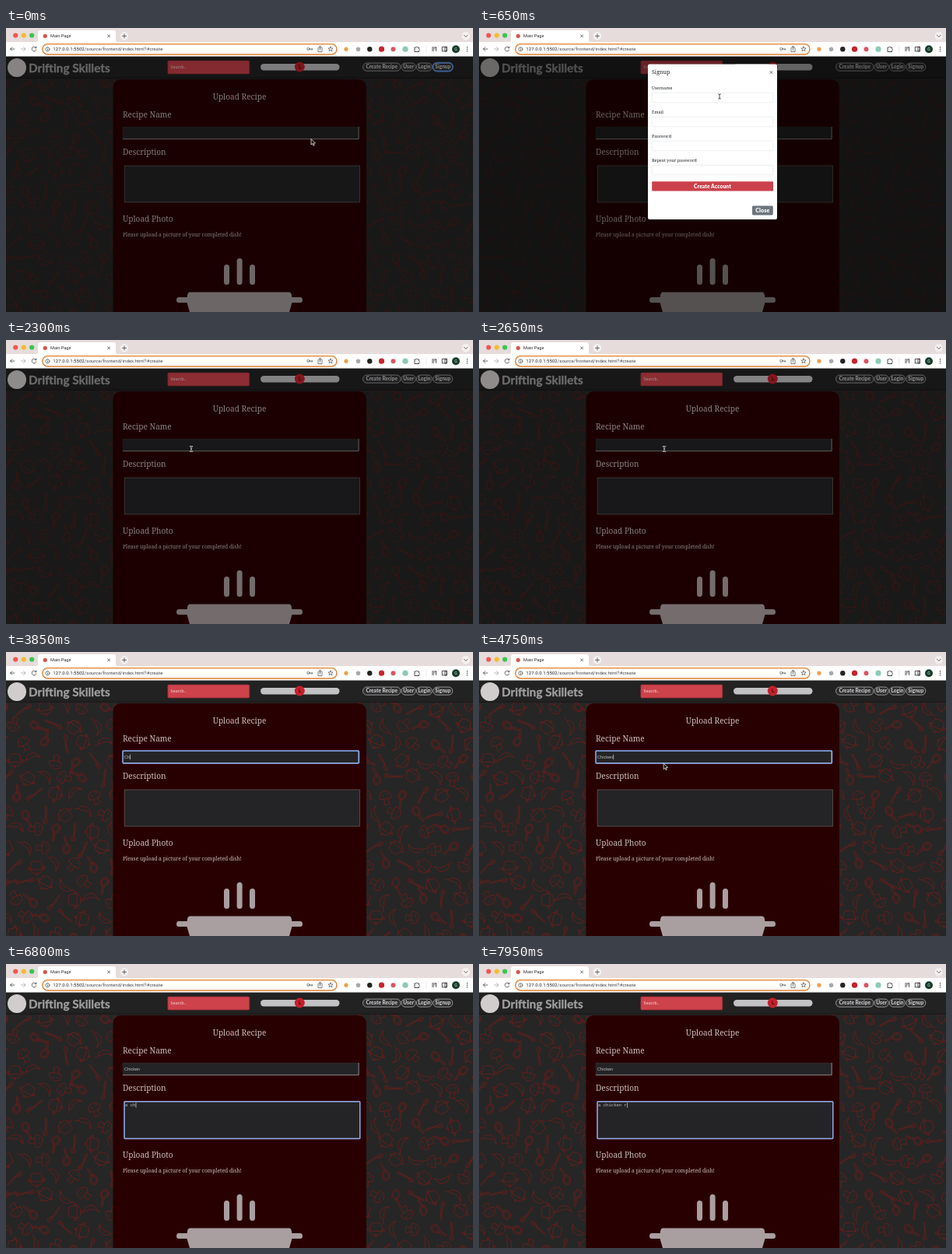
Recreate the animation shown at these times as an HTML page. Size 600 by 365 pixels, loop 8 s.

```html
<!DOCTYPE html>
<html lang="en">
<head>
<meta charset="utf-8">
<title>Upload Recipe</title>
<style>
  html, body { margin: 0; width: 100%; height: 100%; overflow: hidden; background: #262626; }
  svg { display: block; width: 100vw; height: 100vh; }
  text { white-space: pre; }
  .serif { font-family: "Noto Serif", serif; font-weight: 300; }
  .round { font-family: Lato, sans-serif; font-weight: 900; }
  .ui { font-family: Roboto, sans-serif; }
  .mid { text-anchor: middle; }
  .line { fill: none; stroke-linecap: round; stroke-linejoin: round; }
</style>
</head>
<body>
<svg viewBox="0 0 600 365" preserveAspectRatio="none">
  <defs>
    <g id="pan"><ellipse rx="6.5" ry="5"/><ellipse rx="4.5" ry="3.2"/><path d="M6 -2L15 -5.5Q17 -5 15.5 -3.5L6.5 0"/></g>
    <g id="chili"><path d="M-9 3Q-2 6 4 0Q7 -4 9 -3Q11 0 6 5Q-1 11 -9 3M9 -3Q9 -6 12 -7"/></g>
    <g id="spoon"><path d="M-3 0Q-8 -5 -12 -1Q-12 5 -3 0L11 -2Q13 -1 11 0L-3 1M-10 0Q-8 -2 -6 0"/></g>
    <g id="shroom"><path d="M-8 1Q-8 -8 0 -8Q8 -7 8 1Q0 4 -8 1M-3 2Q-2 6 -4 9Q0 11 4 9Q2 5 3 2M-4 -3h2M2 -4h2"/></g>
    <g id="pot"><path d="M-8 -3H8L6 7Q0 9 -6 7ZM-8 -3Q-7 -8 0 -8Q7 -8 8 -3M-1 -8v-2h2v2M-8 0h-3v-2h3M8 0h3v-2h-3"/></g>
  </defs>

  <rect y="36" width="600" height="329" fill="#262626"/>
  <g id="pattern" class="line" stroke="#7c1c17" stroke-width=".65"/>
  <rect x="137.5" y="66" width="325.5" height="320" rx="10" fill="#290001"/>

  <rect y="36" width="600" height="28" fill="#222"/>
  <path d="M0 64.2H600" stroke="#141414" stroke-width=".8"/>
  <circle cx="14" cy="51" r="12" fill="#d2cdcd"/>
  <text x="29" y="57" class="round" style="font-weight:700" font-size="15.3" fill="#a0a0a0" stroke="#a0a0a0" stroke-width=".3" stroke-linejoin="round">Drifting Skillets</text>
  <rect x="207.8" y="42" width="105" height="17" rx="1.5" fill="#cd424b" stroke="#8e2a31" stroke-width=".6"/>
  <text x="211.5" y="52.3" class="serif" font-size="5.3" fill="#f3dcdc">Search..</text>
  <rect x="327" y="46" width="101.5" height="8.4" rx="4.2" fill="#c2c2c4"/>
  <circle cx="377.3" cy="50" r="6.5" fill="#c5202a"/>
  <path class="line" d="M376.8 47.5V51.5H379" stroke="#4a0d10" stroke-width="1"/>
  <g id="nav"/>
  <rect id="navFocus" x="548.2" y="44.6" width="26" height="11" rx="5.5" fill="none" stroke="#5c94e8" stroke-width="1.6"/>

  <g class="serif" fill="#cdbebe" font-size="10.1">
    <text x="300" y="92" class="mid">Upload Recipe</text>
    <text x="150" y="115">Recipe Name</text>
    <text x="150" y="162.5">Description</text>
    <text x="150" y="248.5">Upload Photo</text>
    <text x="150" y="268.3" font-size="6.76">Please upload a picture of your completed dish!</text>
  </g>
  <rect x="150" y="127" width="303.5" height="16" fill="#242426"/>
  <path d="M150.3 143V127.3H453" fill="none" stroke="#3a2a2a" stroke-width=".6"/>
  <path d="M150 142.7H453.1V127" fill="none" stroke="#9a9393" stroke-width=".9"/>
  <rect x="152.2" y="177" width="302.3" height="47" fill="#242426" stroke="#5f5752" stroke-width=".8"/>
  <rect id="nameRing" x="150" y="127" width="303.4" height="16" rx="1" fill="none" stroke="#8db2f6" stroke-width="1.5"/>
  <rect id="descRing" x="152" y="176.8" width="302.8" height="47.6" rx="1" fill="none" stroke="#8fa9ea" stroke-width="1.5"/>
  <text id="name" x="152" y="137" font-family="Liberation Sans, Arial, sans-serif" font-size="5.6" fill="#c0c0c0"/>
  <text id="desc" x="153" y="183" font-family="Liberation Mono, monospace" font-size="5.6" fill="#c0c0c0"/>
  <rect id="caret" width=".7" height="6.4" fill="#d8d8d8"/>

  <g fill="#aa9fa0">
    <rect x="280" y="304" width="7" height="26" rx="3.5"/>
    <rect x="296.6" y="296" width="7" height="34" rx="3.5"/>
    <rect x="313" y="304" width="7" height="26" rx="3.5"/>
    <path d="M236 339.5H364Q367 339.5 367.3 346H378Q381 346.3 381 349.7Q381 353 378 353H367.5L364 365H236L232.5 353H222Q219 353 219 349.7Q219 346.3 222 346H232.7Q233 339.5 236 339.5Z"/>
  </g>

  <rect id="shade" y="36" width="600" height="329"/>

  <g id="modal">
    <rect x="217" y="46.5" width="166" height="199.5" rx="2" fill="#fff"/>
    <text x="222" y="59.3" class="serif" font-size="7.1" fill="#212529">Signup</text>
    <path class="line" d="M374 55.5l3 3m0 -3l-3 3" stroke="#555" stroke-width=".8"/>
    <g id="fields"/>
    <rect x="222.2" y="197.3" width="155.8" height="12.3" rx="1.2" fill="#cb414b"/>
    <text x="300" y="205.8" class="round mid" font-size="6.7" letter-spacing=".1" fill="#fff">Create Account</text>
    <rect id="closeRing" x="349.8" y="227.3" width="29.2" height="14.4" rx="2" fill="#14181c"/>
    <rect x="351" y="228.5" width="26.8" height="12" rx="1.4" fill="#6c757d"/>
    <text x="364.4" y="237" class="round mid" font-size="7" letter-spacing=".15" fill="#fff">Close</text>
  </g>

  <g id="chrome" class="ui">
    <rect width="600" height="19" fill="#e5dcdb"/>
    <rect y="18" width="600" height="18.5" fill="#fff"/>
    <path d="M38 18.5Q41 18 41 15V6Q41 3 44 3H138Q141 3 141 6V15Q141 18 144 18.5Z" fill="#fff"/>
    <circle cx="12.3" cy="9.5" r="3.1" fill="#f2574f"/>
    <circle cx="22.8" cy="9.5" r="3.1" fill="#f6bb2f"/>
    <circle cx="33.2" cy="9.5" r="3.1" fill="#37c64a"/>
    <circle cx="50.3" cy="10.3" r="2.6" fill="#d2574a"/>
    <circle cx="152" cy="10.3" r="5.2" fill="#f6f1f1"/>
    <circle cx="590.8" cy="10.3" r="5.2" fill="#f6f1f1"/>
    <text x="57" y="12.3" font-size="5.6" fill="#333">Main Page</text>
    <g class="line" stroke="#444" stroke-width=".8">
      <path d="M130.6 8.8l3 3m0 -3l-3 3M149.5 10.3h5m-2.5 -2.5v5M588.5 9.2l2.3 2.3l2.3 -2.3"/>
      <path d="M11 27H5.5m2.4 -2.4L5.5 27l2.4 2.4"/>
      <path d="M19.5 27H25m-2.4 -2.4L25 27l-2.4 2.4" stroke="#aaa"/>
      <path d="M38.6 25.4A2.9 2.9 0 1 0 38.9 28M38.9 23.9v1.8h-1.8"/>
    </g>
    <rect x="46.8" y="20.6" width="378.2" height="13.4" rx="6.7" fill="#fff" stroke="#e0812f" stroke-width="1.4"/>
    <g class="line" stroke="#555" stroke-width=".75">
      <circle cx="53.5" cy="27.2" r="2.5"/><path d="M53.5 27v1.5M53.5 25.8v.1"/>
      <circle cx="388.4" cy="27" r="1.6"/><path d="M390 27h4m-1 0v1.5"/>
      <path d="M402 25.6h-1v5h5v-5h-1M403.5 28.5v-5.3m-1.6 1.6l1.6 -1.6l1.6 1.6"/>
      <path d="M417 24l.9 2h2.2l-1.7 1.4l.6 2.2l-2 -1.2l-2 1.2l.6 -2.2l-1.7 -1.4h2.2z"/>
    </g>
    <text x="60.3" y="29.3" font-size="6.08" fill="#444"><tspan fill="#222">127.0.0.1:5502</tspan>/source/frontend/index.html?#create</text>
    <g id="icons"/>
    <path class="line" d="M547.5 25h5M547.5 27h3M547.5 29h2M552.5 25v4.4" stroke="#333" stroke-width=".9"/>
    <path d="M560.3 24.3h6v5.6h-6zM564 24.3h2.3v5.6h-2.3z" fill="none" stroke="#333" stroke-width=".9"/>
    <circle cx="578" cy="27.2" r="5" fill="#173c2b"/>
    <text x="578" y="29.1" class="mid" font-size="5.2" fill="#d6e8dd">G</text>
    <g fill="#444"><circle cx="592.5" cy="24.7" r=".75"/><circle cx="592.5" cy="27.2" r=".75"/><circle cx="592.5" cy="29.7" r=".75"/></g>
  </g>

  <g id="mouse">
    <path id="arrow" d="M0 -3.5V4L1.8 2.5L3 5.2L4.2 4.6L3 2H5.4Z" fill="#111" stroke="#fff" stroke-width=".7"/>
    <g id="beam" class="line">
      <path d="M-1.4 -3.2Q0 -3.2 0 -2.2V2.2Q0 3.2 -1.4 3.2M1.4 -3.2Q0 -3.2 0 -2.2M0 2.2Q0 3.2 1.4 3.2" stroke="#fff" stroke-width="1.6"/>
      <path d="M-1.4 -3.2Q0 -3.2 0 -2.2V2.2Q0 3.2 -1.4 3.2M1.4 -3.2Q0 -3.2 0 -2.2M0 2.2Q0 3.2 1.4 3.2" stroke="#222" stroke-width=".8"/>
    </g>
    <path id="hand" d="M-1.2 -3Q-.5 -4 .1 -3V-.8L2.7 -.3Q3.4 0 3.2 1L2.5 3.4H-.8L-2.7 .8Q-2.5 -.2 -1.2 .6Z" fill="#fff" stroke="#111" stroke-width=".6"/>
  </g>
</svg>
<script>
const LOOP = 8000, TICK = 50;
const $ = id => document.getElementById(id);
const show = (id, on) => $(id).setAttribute('display', on ? 'inline' : 'none');
const clamp = v => Math.min(1, Math.max(0, v));
const easeOut = p => 1 - (1 - p) ** 1.7;
const easeInOut = p => p * p * (3 - 2 * p);

// Interpolates rows of [time, ...values].
function track(rows, t, ease = p => p) {
  let i = 0;
  while (i < rows.length - 2 && t >= rows[i + 1][0]) i++;
  const [a, b] = [rows[i], rows[i + 1]];
  const p = ease(clamp((t - a[0]) / (b[0] - a[0])));
  return a.slice(1).map((v, k) => v + (b[k + 1] - v) * p);
}

function drawPattern() {
  let seed = 11;
  const rand = () => (seed = seed * 16807 % 2147483647) / 2147483647;
  const kinds = ['pan', 'chili', 'spoon', 'shroom', 'pot'];
  let out = '';
  for (let row = 0; row < 14; row++) {
    for (let col = 0; col < 25; col++) {
      const x = col * 25 + (row % 2) * 12 + rand() * 6 - 3;
      const y = 72 + row * 22.5 + rand() * 6 - 3;
      const turn = rand() * 360, kind = kinds[(col * 2 + row * 3) % 5];
      if (x > 152 && x < 448) continue;
      out += `<use href="#${kind}" transform="translate(${x.toFixed(1)} ${y.toFixed(1)}) rotate(${turn.toFixed()})"/>`;
    }
  }
  $('pattern').innerHTML = out;
}

function drawParts() {
  const nav = [['Create Recipe', 458.5, 48.5], ['User', 508, 18.3], ['Login', 527.4, 20], ['Signup', 548.8, 25]];
  $('nav').innerHTML = nav.map(([label, x, w]) =>
    `<rect x="${x}" y="45" width="${w}" height="10.2" rx="5" fill="#303032" stroke="#9c9c9c" stroke-width=".9"/>
     <text x="${x + w / 2}" y="52.3" class="round mid" font-size="6.5" fill="#c0c0c0">${label}</text>`).join('');
  $('fields').innerHTML = ['Username', 'Email', 'Password', 'Repeat your password'].map((label, i) =>
    `<text x="222" y="${78.8 + i * 31}" class="serif" font-size="5.45" fill="#212529">${label}</text>
     <rect x="222.3" y="${83.3 + i * 31}" width="155.6" height="12.5" rx="1.2" fill="#fff" stroke="#e6e8eb" stroke-width=".7"/>`).join('');
  const icons = [[437, '#e8a24c', 2.6], [452.5, '#a9a9a9', 2.8], [467.3, '#222', 3.2], [482.5, '#c8232c', 3.6],
    [497.5, '#d9556a', 3], [513, '#8cc9b4', 3.6]];
  $('icons').innerHTML = icons.map(([x, fill, r]) => `<circle cx="${x}" cy="27.2" r="${r}" fill="${fill}"/>`).join('') +
    '<path d="M525 25h1.8a1.2 1.2 0 0 1 2.2 0h1.6v1.6a1.2 1.2 0 0 1 0 2.2v1.7H525z" fill="none" stroke="#333" stroke-width=".9"/>' +
    '<path d="M540 22.5v9" stroke="#ddd" stroke-width=".7"/>';
}

const mousePath = [[0, 392, 146], [250, 309, 88], [650, 309, 88], [1400, 363, 237], [1850, 364, 239],
  [2300, 238, 140], [4600, 238, 140], [5350, 230, 203], [LOOP, 230, 203]];
const shadePath = [[0, .36], [250, .5], [1850, .48], [2100, .33], [2650, .32], [3000, 0], [LOOP, 0]];
const nameKeys = [3700, 3800, 3900, 4050, 4150, 4300, 4400];
const descKeys = [6300, 6450, 6650, 6800, 7050, 7200, 7350, 7500, 7650, 7800, 7900];
const pointers = [[0, 'arrow'], [200, 'beam'], [800, 'arrow'], [1300, 'hand'], [1900, 'arrow'], [2250, 'beam'],
  [4700, 'arrow'], [5050, 'beam']];
const NAME_CLICK = 3300, DESC_CLICK = 5300, CLOSE_CLICK = 1740;

const typed = (word, keys, t) => word.slice(0, keys.filter(k => k <= t).length);

function drawCaret(t) {
  const inDesc = t >= DESC_CLICK;
  const field = $(inDesc ? 'desc' : 'name');
  const last = [NAME_CLICK, ...nameKeys, DESC_CLICK, ...descKeys].filter(k => k <= t).pop();
  show('caret', last !== undefined && (t - last) % 1000 < 500);
  const width = inDesc ? field.textContent.length * 3.36 : field.textContent && field.getComputedTextLength();
  $('caret').setAttribute('x', (inDesc ? 153 : 152) + Number(width) + .2);
  $('caret').setAttribute('y', inDesc ? 178.2 : 131.8);
}

function drawModal(t) {
  const opening = t < 1000;
  const fade = opening ? clamp(t / 200) : 1 - clamp((t - CLOSE_CLICK) / 135);
  const lift = opening ? 1 - easeOut(clamp(t / 250)) : easeOut(clamp((t - CLOSE_CLICK) / 300));
  $('modal').setAttribute('opacity', fade);
  $('modal').setAttribute('transform', `translate(0 ${-50 * lift})`);
  show('modal', fade > 0);
  show('closeRing', t >= 1500);
}

function drawMouse(t) {
  const [x, y] = track(mousePath, t, easeInOut);
  const kind = pointers.filter(p => p[0] <= t).pop()[1];
  $('mouse').setAttribute('transform', `translate(${x} ${y})`);
  show('mouse', !(t >= 3700 && t < 4600) && t < 6300);
  for (const id of ['arrow', 'beam', 'hand']) show(id, id === kind);
}

function draw(t) {
  const [shade] = track(shadePath, t);
  $('shade').setAttribute('opacity', shade);
  $('pattern').setAttribute('opacity', 1 - shade);
  $('name').textContent = typed('Chicken', nameKeys, t);
  $('desc').textContent = typed('a chicken r', descKeys, t);
  show('navFocus', t < 100);
  show('nameRing', t >= NAME_CLICK && t < DESC_CLICK);
  show('descRing', t >= DESC_CLICK);
  drawCaret(t);
  drawModal(t);
  drawMouse(t);
}

drawPattern();
drawParts();
const start = performance.now();
function frame() {
  const t = (performance.now() - start) % LOOP;
  draw(Math.floor(t / TICK) * TICK);
  requestAnimationFrame(frame);
}
frame();
</script>
</body>
</html>
```
